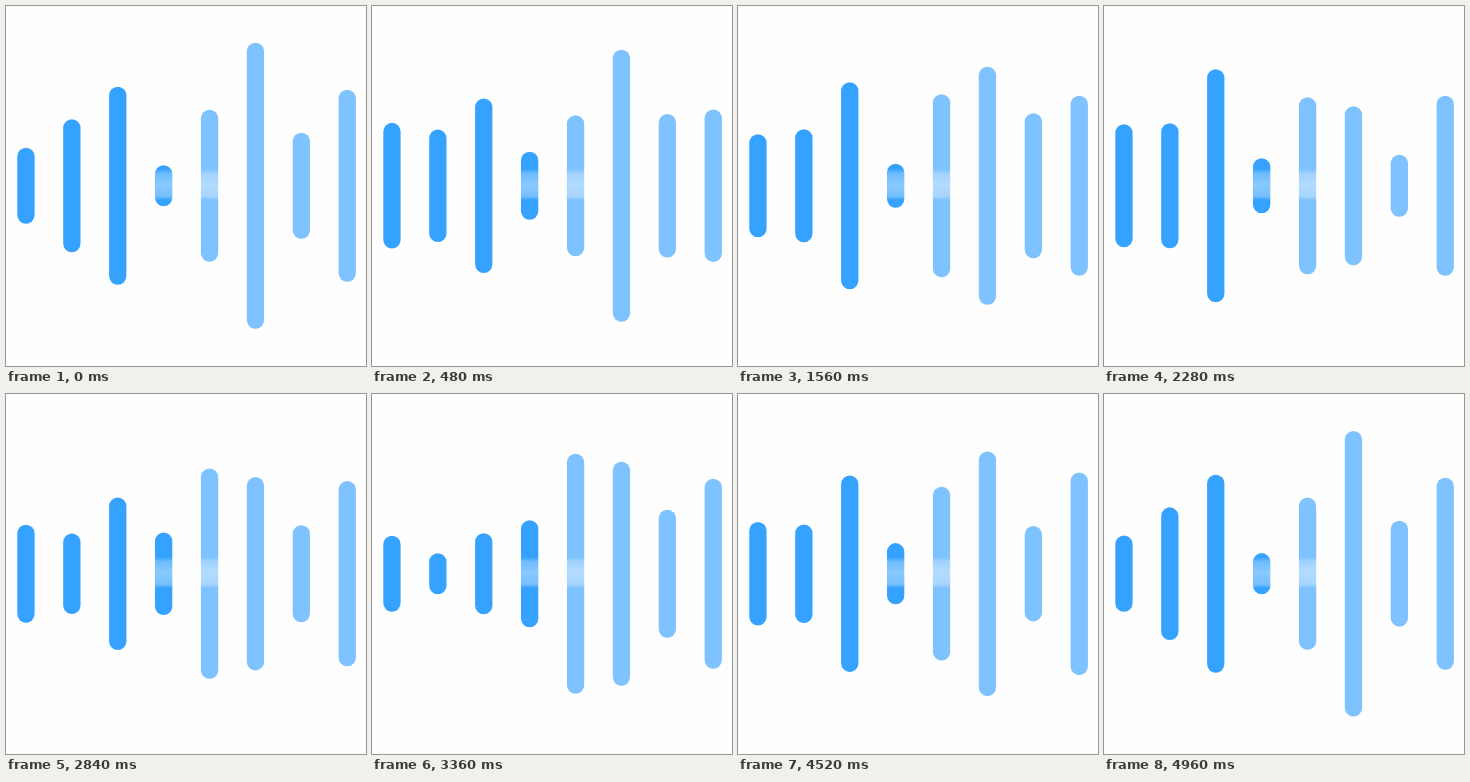
These frames come from a looping animation (360 px wide and 360 px high, 5000 ms). An HTML page:

```html
<!DOCTYPE html>
<html lang="en">
<head>
<meta charset="utf-8">
<title>Sound wave</title>
<style>
  html, body { margin: 0; width: 100%; height: 100%; overflow: hidden; background: #fefefe; }
  svg { display: block; width: 100vw; height: 100vh; }
</style>
</head>
<body>
<svg viewBox="0 0 360 360">
  <defs>
    <linearGradient id="haze" x2="0" y2="1">
      <stop offset="0" stop-color="#fefefe" stop-opacity="0"/>
      <stop offset=".15" stop-color="#fefefe" stop-opacity=".28"/>
      <stop offset=".5" stop-color="#fefefe" stop-opacity=".42"/>
      <stop offset=".88" stop-color="#fefefe" stop-opacity=".32"/>
      <stop offset="1" stop-color="#fefefe" stop-opacity="0"/>
    </linearGradient>
  </defs>
  <g id="bars"></g>
  <rect x="147" y="163" width="67" height="31" fill="url(#haze)"/>
</svg>
<script>
const LOOP = 5000, LEFT = 11.3, GAP = 45.9, WIDTH = 17.3, MIDDLE = 179.7;

// Each beat eases every bar to its next height; the last leads back to the first
const BEATS = [
  { t: 0,    h: [76, 133, 198, 41, 152, 286, 106, 192] },
  { t: 960,  h: [175, 92, 151, 95, 130, 258, 181, 113] },
  { t: 1560, h: [103, 113, 207, 44, 183, 238, 145, 180] },
  { t: 2280, h: [123, 125, 233, 55, 177, 159, 62, 180] },
  { t: 3360, h: [76, 41, 81, 107, 240, 224, 128, 190] },
  { t: 4080, h: [128, 68, 195, 79, 193, 208, 86, 212] }
];

const ease = p => p * p * (3 - 2 * p);

const group = document.getElementById("bars");
const bars = BEATS[0].h.map((_, i) => {
  const bar = document.createElementNS("http://www.w3.org/2000/svg", "rect");
  bar.setAttribute("x", LEFT + i * GAP);
  bar.setAttribute("width", WIDTH);
  bar.setAttribute("rx", WIDTH / 2);
  bar.setAttribute("fill", i < 4 ? "#35a2ff" : "#7ec2ff");
  return group.appendChild(bar);
});

function draw(t) {
  const k = BEATS.findLastIndex(beat => beat.t <= t);
  const from = BEATS[k], to = BEATS[(k + 1) % BEATS.length];
  const p = ease((t - from.t) / ((to.t || LOOP) - from.t));
  bars.forEach((bar, i) => {
    const h = from.h[i] + (to.h[i] - from.h[i]) * p;
    bar.setAttribute("y", MIDDLE - h / 2);
    bar.setAttribute("height", h);
  });
}

const start = performance.now();
function tick() {
  draw((performance.now() - start) % LOOP);
  requestAnimationFrame(tick);
}
draw(0);
requestAnimationFrame(tick);
</script>
</body>
</html>
```
